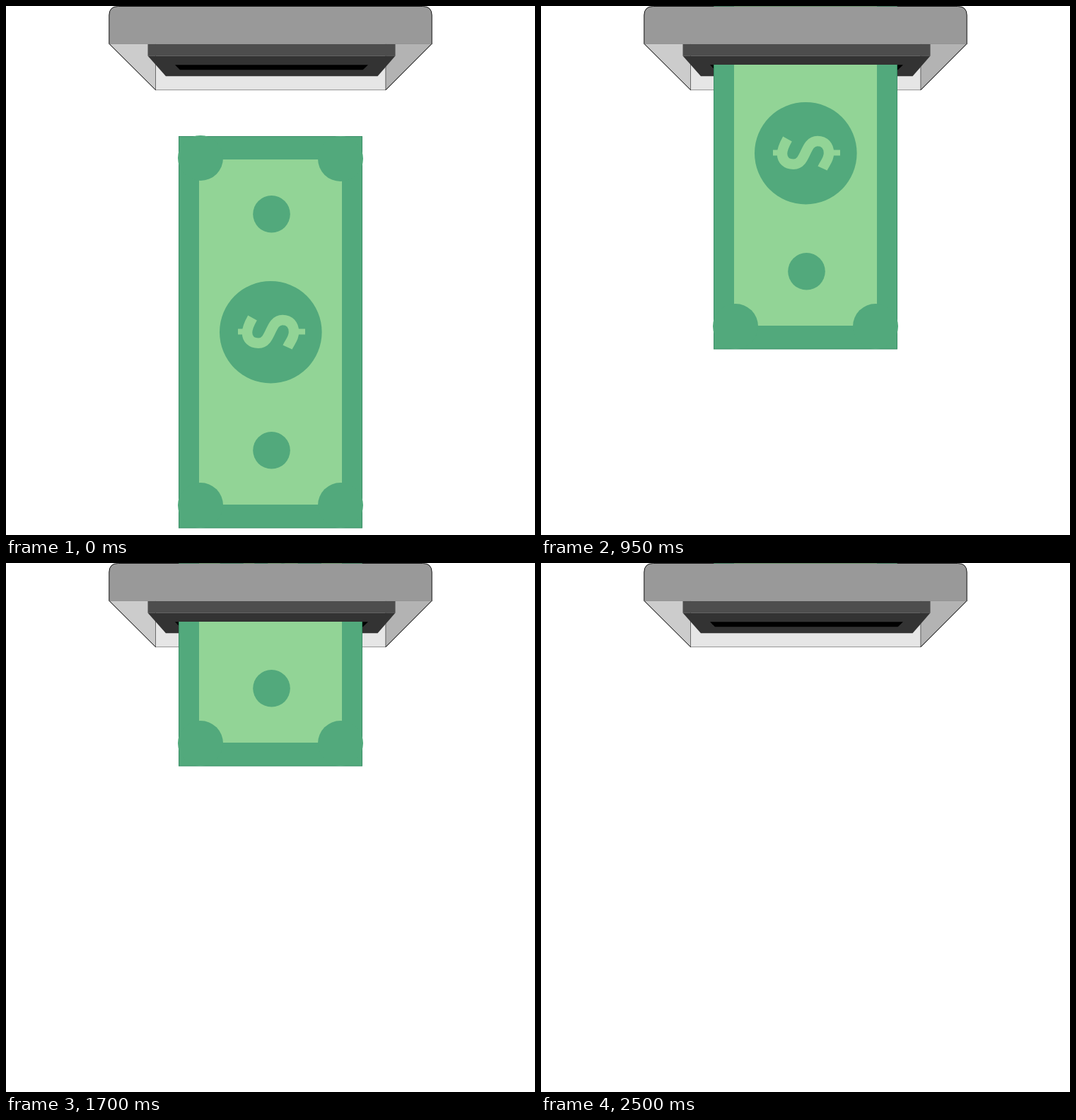
Write an HTML page that moves like this. It is 748 px wide and 748 px high and loops after 2600 ms.

```html
<!DOCTYPE html>
<html lang="en">
<head>
<meta charset="utf-8">
<title>Bill drawn into a cash slot</title>
<style>
  html, body { margin: 0; width: 100%; height: 100%; overflow: hidden; background: #fff; }
  svg { display: block; width: 100vw; height: 100vh; }
  .dark { fill: #52a97c; }
  .light { fill: #92d496; }
</style>
</head>
<body>
<svg viewBox="0 0 748 748">
  <defs>
    <clipPath id="below"><rect y="83" width="748" height="665"/></clipPath>
    <clipPath id="edge"><rect width="748" height="1"/></clipPath>
    <g id="bill">
      <g id="slide" class="dark">
        <rect x="244.5" y="184.5" width="259" height="553.5" stroke="#31895f" stroke-width=".9"/>
        <rect class="light" x="273" y="217" width="202" height="488"/>
        <circle cx="275" cy="215" r="32"/>
        <circle cx="473" cy="216" r="32"/>
        <circle cx="275" cy="706" r="32"/>
        <circle cx="473" cy="706" r="32"/>
        <circle cx="375.5" cy="294.3" r="26.3"/>
        <circle cx="375.5" cy="628.3" r="26.3"/>
        <circle cx="374.3" cy="461.2" r="72.3"/>
        <path class="light" d="M328 456.5h9v8h-9zM411 456.5h12v8h-12z"/>
        <path d="M348.5 441C344 449 341 455 341 462C341 471 347 476.700 357 476.700C376 476.700 372 444 391 444C401 444 407 451 407 461C407 470 402 474 398 482.500"
              fill="none" stroke="#92d496" stroke-width="14.5"/>
      </g>
    </g>
  </defs>

  <g stroke="#000" stroke-width=".4">
    <path fill="#e6e6e6" d="M211.500 53.500H537V118.700H211.500z"/>
    <path fill="#ccc" d="M146 53.500L211.500 118.700V53.500z"/>
    <path fill="#b3b3b3" d="M602 53.500L537 118.700V53.500z"/>
    <path fill="none" stroke-width=".9" d="M146 53.500L211.500 118.700M602 53.500L537 118.700"/>
    <path fill="#999" stroke-width=".9" d="M145.800 53.800V13Q146 .5 158.500 .5H589.500Q602 .5 602.200 13V53.800"/>
  </g>
  <path fill="#4d4d4d" d="M200.500 54H550.500V70.500H200.500z"/>
  <path fill="#333" d="M200.500 70.500H550.500L525.500 99.300H226z"/>
  <path d="M239 83.300H512L504.500 90.300H246z"/>

  <use href="#bill" clip-path="url(#below)"/>
  <use href="#bill" clip-path="url(#edge)" opacity=".6"/>
</svg>
<script>
  const LOOP = 2600, LAST_STEP = 60, STEP_PX = 11;
  const slide = document.getElementById('slide');

  // 24 steps per second, each starting on a whole hundredth of a second
  function draw(now) {
    const ticks = Math.floor((now % LOOP) / 10);
    const step = Math.min(LAST_STEP, Math.ceil((ticks + 1) * 6 / 25) - 1);
    slide.setAttribute('transform', `translate(0 ${-step * STEP_PX})`);
  }

  const start = performance.now();
  function tick() {
    draw(performance.now() - start);
    requestAnimationFrame(tick);
  }
  tick();
</script>
</body>
</html>
```
